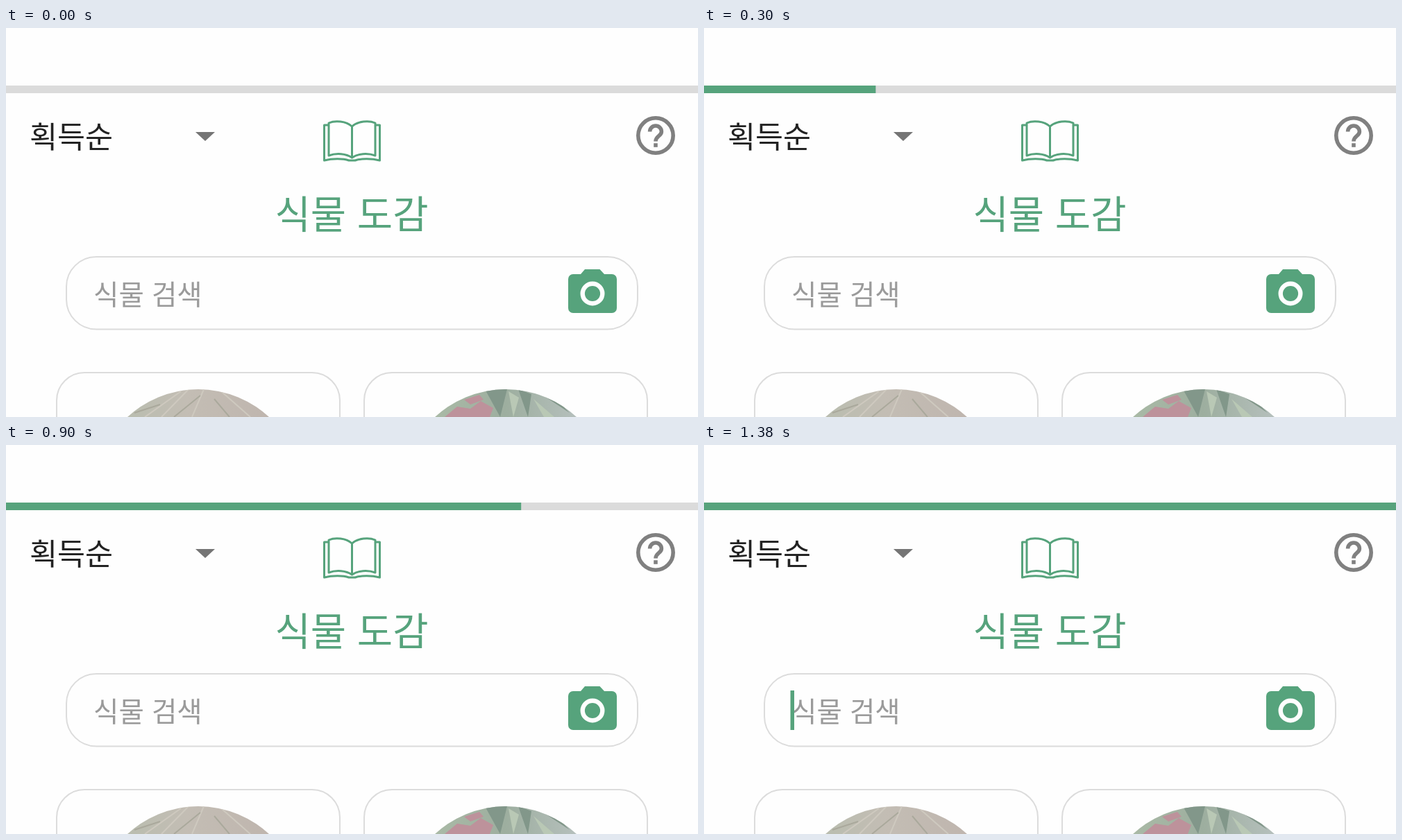
Animation of 997 by 561 pixels, one loop 1.5 s. Source, as an HTML page:

```html
<!DOCTYPE html>
<html lang="ko">
<head>
<meta charset="utf-8">
<title>식물 도감</title>
<style>
  html, body { margin: 0; width: 100%; height: 100%; overflow: hidden; background: #fefefe; }
  svg { display: block; width: 100%; height: 100%; }
  text { font-family: "Noto Sans CJK KR", "Noto Sans CJK", sans-serif; }
  .light { font-weight: 300; }
  .frame { fill: #fefefe; stroke: #dcdcdc; stroke-width: 2; }
  .green { fill: #56a37c; }
  .book { fill: none; stroke: #56a37c; stroke-width: 3; stroke-linejoin: round; }
</style>
</head>
<body>
<svg viewBox="0 0 997 561">
  <defs>
    <linearGradient id="dry">
      <stop offset=".15" stop-color="#b9bdaf"/>
      <stop offset=".45" stop-color="#c3bdb4"/>
      <stop offset=".85" stop-color="#bfb5ae"/>
    </linearGradient>
    <linearGradient id="leafy">
      <stop offset=".15" stop-color="#aabaa6"/>
      <stop offset=".5" stop-color="#9dae9f"/>
      <stop offset=".85" stop-color="#b6c0bd"/>
    </linearGradient>
    <clipPath id="left"><circle cx="277" cy="671" r="150"/></clipPath>
    <clipPath id="right"><circle cx="720" cy="671" r="150"/></clipPath>
  </defs>

  <rect y="83" width="997" height="11" fill="#dbdbdb"/>
  <rect id="bar" class="green" y="83" width="0" height="11"/>

  <text class="light" x="34" y="173" font-size="43.5" fill="#222">획득순</text>
  <path d="M273 150H301L287 163Z" fill="#757575"/>

  <path class="book" d="M498.5 142C490 134 474 133 465 137V184C476 180 490 181 498.5 187C507 181 521 180 532 184V137C523 133 507 134 498.5 142V187"/>
  <path class="book" d="M465 140H458.5V191C470 188 486 188 494 191H503C511 188 527 188 538.5 191V140H532"/>
  <text class="light green" x="498" y="289" font-size="55.8" text-anchor="middle">식물 도감</text>

  <g fill="none" stroke="#808080" stroke-width="5.6">
    <circle cx="936" cy="155" r="25.2"/>
    <path d="M927.6 149.4a8.4 8.4 0 0 1 16.8 0c0 6.3-8.4 6.3-8.4 14"/>
    <path d="M936 166.2v5.6"/>
  </g>

  <rect class="frame" x="87" y="330" width="823" height="104.5" rx="43"/>
  <text x="126" y="398.5" font-size="39.6" fill="#9a9a9a">식물 검색</text>
  <rect id="caret" class="green" x="124.5" y="354" width="5.5" height="57"/>

  <path class="green" d="M834 348h21.5l6.5 7h11a7 7 0 0 1 7 7v42a7 7 0 0 1-7 7h-56a7 7 0 0 1-7-7v-42a7 7 0 0 1 7-7h11z"/>
  <circle cx="845" cy="383" r="14.3" fill="none" stroke="#fefefe" stroke-width="6.4"/>

  <rect class="frame" x="73" y="497" width="408" height="360" rx="40"/>
  <rect class="frame" x="516" y="497" width="408" height="360" rx="40"/>

  <g clip-path="url(#left)">
    <rect x="127" y="521" width="300" height="40" fill="url(#dry)"/>
    <path d="M200 561L252 524M224 561L264 520M285 521L268 561M310 524L352 561" fill="none" stroke="#cec9bf" stroke-width="2"/>
    <path d="M185 555L222 543M242 561L280 530M322 561L300 535" fill="none" stroke="#aaa99c" stroke-width="2"/>
  </g>
  <g clip-path="url(#right)">
    <rect x="570" y="521" width="300" height="40" fill="url(#leafy)"/>
    <path d="M690 521L712 561L722 521ZM738 521L752 561L757 528ZM765 524L812 555L785 528Z" fill="#82978a"/>
    <path d="M724 524L731 561L739 533ZM760 535L790 561L775 561Z" fill="#b9c8b5"/>
    <path d="M632 561L650 546L669 549L684 538L702 548L697 561ZM660 536L682 529L688 536L669 543Z" fill="#bd929b"/>
  </g>
</svg>
<script>
  const STEP = 300, STEPS = 5;
  const bar = document.getElementById("bar");
  const caret = document.getElementById("caret");

  function draw(now) {
    const step = Math.floor(now / STEP) % STEPS;
    bar.setAttribute("width", step === STEPS - 1 ? 997 : step * 247.4);
    caret.setAttribute("visibility", step && step % 2 === 0 ? "visible" : "hidden");
  }

  function tick() {
    draw(performance.now());
    requestAnimationFrame(tick);
  }
  tick();
</script>
</body>
</html>
```
